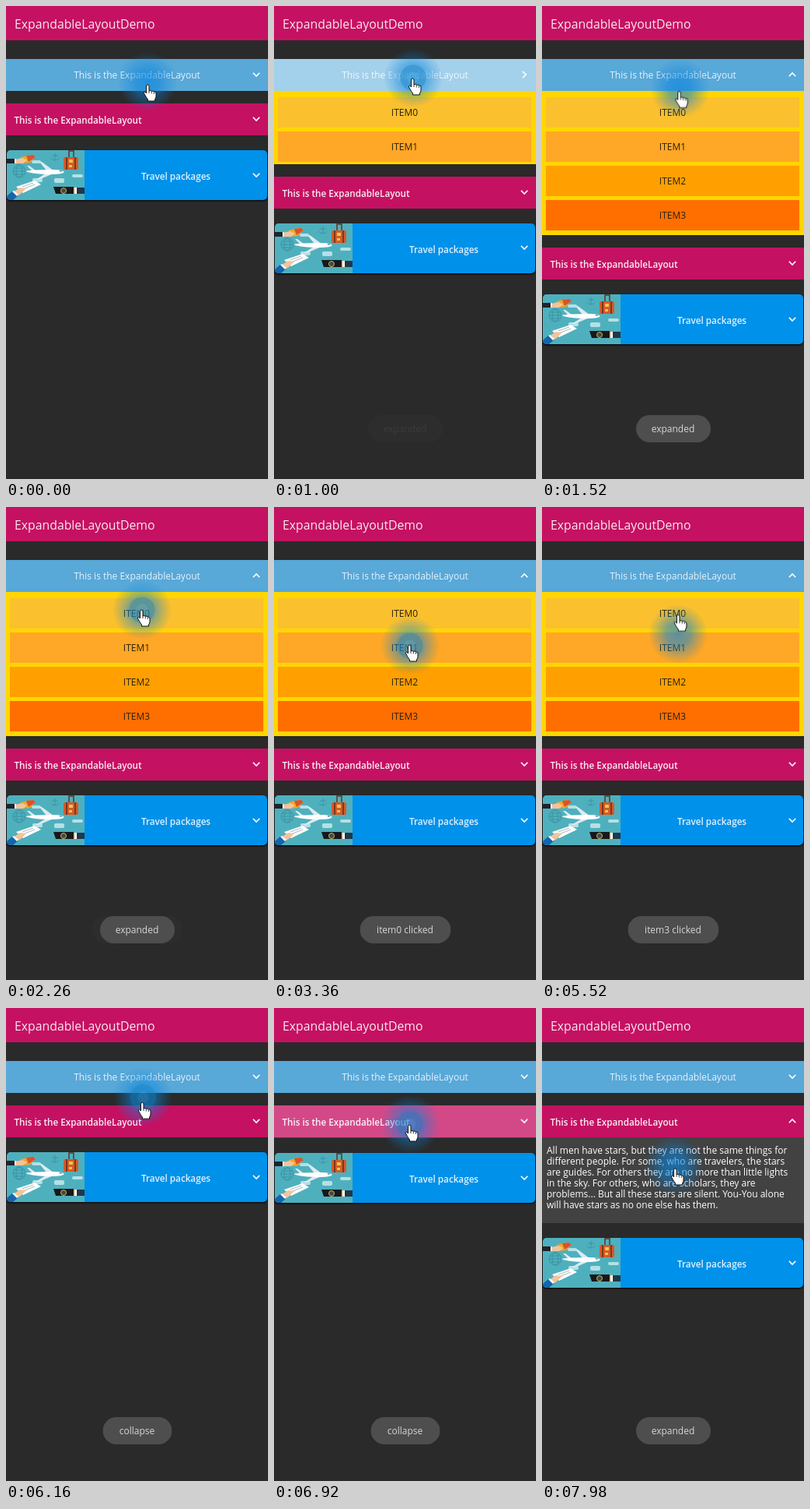
An HTML page that plays this animation: 337 px wide and 607 px high, repeating every 8 s.

```html
<!DOCTYPE html>
<html lang="en">
<head>
<meta charset="utf-8">
<title>ExpandableLayoutDemo</title>
<style>
html, body { margin: 0; width: 100%; height: 100%; overflow: hidden; background: #2a2a2a; }
#stage { position: relative; width: 337px; height: 607px; overflow: hidden; background: #2a2a2a;
  font: 400 12px "Open Sans", "Noto Sans", sans-serif; color: #fff; }
#stage * { box-sizing: border-box; }

.bar { height: 44px; margin-bottom: 24px; padding-left: 11px; font-size: 15.8px; line-height: 47px;
  color: #f8e8f0; background: #c51162; }
.head { position: relative; height: 41px; line-height: 42px; }
.sky { background: #58a8d8; text-align: center; color: #e6f2fa; }
.pink { margin-top: 16px; padding-left: 10.5px; background: #c51162; font-weight: 600; font-size: 11.7px; color: #fbeef4; }
.chevron { position: absolute; left: 317px; top: 50%; width: 10px; height: 10px; margin-top: -5.5px;
  fill: none; stroke: #fff; stroke-width: 1.6; }
.ripple { position: absolute; inset: 0; background: #fff; opacity: 0; }

.fold { height: 0; overflow: hidden; }
.items { height: 185px; padding: 8px 6px 0 5px; background: #ffd600; color: #2b2210; }
.items div { height: 39px; margin-bottom: 5px; line-height: 39px; text-align: center; }
.quote { height: 110px; padding: 10px 0 0 6px; background: #424242; line-height: 14.1px; white-space: nowrap; }

.card { position: relative; width: 335px; height: 64px; margin: 19px 0 0 1px; border-radius: 5px;
  overflow: hidden; background: #0091ea; }
.shade { filter: drop-shadow(0 1px 1px #000); }
.card svg.art { position: absolute; left: 0; top: 0; }
.card span { position: absolute; left: 100px; right: 0; text-align: center; line-height: 66px;
  font-weight: 600; font-size: 11.7px; color: #e0f1fd; }
.card .chevron { left: 316px; }

.toast { position: absolute; left: 168.5px; top: 525px; height: 35px; border-radius: 18px; line-height: 35px;
  text-align: center; background: #4e4e4e; color: #d6d6d6; opacity: 0; transform: translateX(-50%); }

.halo, .hand { position: absolute; left: 0; top: 0; }
.halo i { position: absolute; left: -38px; top: -38px; width: 76px; height: 76px; border-radius: 50%;
  background: radial-gradient(closest-side, #0a84dca8, #0a84dc88 40%, #0a84dc40 70%, #0a84dc00); }
.halo b { position: absolute; left: -17px; top: -17px; width: 34px; height: 34px; border-radius: 50%;
  background: radial-gradient(closest-side, #55b0d030 40%, #1a80b038 46%, #1a80b050 94%, #1a80b000); }

/* one shared 8 s clock: 1% = 80 ms */
.run { animation: 8s ease-in-out infinite; }
#fold1 { animation-name: fold1; }
#fold2 { animation-name: fold2; }
#turn1 { animation-name: turn1; }
#turn2 { animation-name: turn2; }
#ripple1 { animation-name: ripple1; }
#ripple2 { animation-name: ripple2; }
.hand { animation-name: path; }
.halo { animation-name: trail; }
.halo b { animation-name: press; }
@keyframes fold1 { 0%, 10.94% { height: 0 } 14.06%, 71.9% { height: 185px } 75%, 100% { height: 0 } }
@keyframes fold2 { 0%, 86.25% { height: 0 } 89.4%, 100% { height: 110px } }
@keyframes turn1 { 0%, 10.94% { transform: none } 14.06%, 71.9% { transform: rotate(-180deg) } 75%, 100% { transform: none } }
@keyframes turn2 { 0%, 86.25% { transform: none } 89.4%, 100% { transform: rotate(-180deg) } }
@keyframes ripple1 { 0%, 10% { opacity: 0 } 11.5%, 12.6% { opacity: .45 } 16%, 71% { opacity: 0 }
  72.5%, 73.2% { opacity: .45 } 76.5%, 100% { opacity: 0 } }
@keyframes ripple2 { 0%, 85.5% { opacity: 0 } 87%, 88% { opacity: .3 } 91%, 100% { opacity: 0 } }
@keyframes path {
  0% { transform: translate(182px, 101px) }
  8%, 14% { transform: translate(178px, 93px) }
  25%, 31% { transform: translate(174px, 132px) }
  40%, 45% { transform: translate(174px, 177px) }
  53%, 59% { transform: translate(172px, 217px) }
  63.5%, 65.5% { transform: translate(172px, 262px) }
  71%, 73% { transform: translate(176px, 92px) }
  81%, 91% { transform: translate(174px, 150px) }
  100% { transform: translate(171px, 206px) }
}
@keyframes trail {
  0% { transform: translate(182px, 97px) }
  8.5%, 14.5% { transform: translate(179px, 92px) }
  25.5%, 31.5% { transform: translate(175px, 132px) }
  40.5%, 45.5% { transform: translate(175px, 178px) }
  53.5%, 59.5% { transform: translate(172px, 217px) }
  64%, 66% { transform: translate(172px, 262px) }
  71.5%, 73.5% { transform: translate(177px, 92px) }
  81.5%, 91.5% { transform: translate(175px, 149px) }
  100% { transform: translate(170px, 202px) }
}
@keyframes press {
  0%, 9.5% { opacity: 0 } 10.5%, 13.5% { opacity: 1 }
  15.5%, 25.5% { opacity: 0 } 26.5%, 29.5% { opacity: 1 }
  31.5%, 40% { opacity: 0 } 41%, 44% { opacity: 1 }
  46%, 54% { opacity: 0 } 55.5%, 58.5% { opacity: 1 }
  60%, 63% { opacity: 0 } 64%, 66.5% { opacity: 1 }
  68%, 70.5% { opacity: 0 } 71.5%, 77.2% { opacity: 1 }
  79%, 84.5% { opacity: 0 } 85.5%, 88.5% { opacity: 1 }
  90.5%, 100% { opacity: 0 }
}
</style>
</head>
<body>
<div id="stage">
  <div class="bar">ExpandableLayoutDemo</div>

  <div class="head sky">This is the ExpandableLayout
    <div class="ripple run" id="ripple1"></div>
    <svg class="chevron run" id="turn1" viewBox="0 0 10 10"><path d="M.8 2.8 5 7 9.2 2.8"/></svg>
  </div>
  <div class="fold run" id="fold1">
    <div class="items">
      <div style="background:#fbc02d">ITEM0</div>
      <div style="background:#ffa726">ITEM1</div>
      <div style="background:#ffa000">ITEM2</div>
      <div style="background:#ff6f00">ITEM3</div>
    </div>
  </div>

  <div class="head pink">This is the ExpandableLayout
    <div class="ripple run" id="ripple2"></div>
    <svg class="chevron run" id="turn2" viewBox="0 0 10 10"><path d="M.8 2.8 5 7 9.2 2.8"/></svg>
  </div>
  <div class="fold run" id="fold2">
    <div class="quote">All men have stars, but they are not the same things for<br>different people. For some, who are travelers, the stars<br>are guides. For others they are no more than little lights<br>in the sky. For others, who are scholars, they are<br>problems... But all these stars are silent. You-You alone<br>will have stars as no one else has them.</div>
  </div>

  <div class="shade"><div class="card">
    <svg class="art" width="100" height="64">
      <path fill="#4fb0bd" d="M0 0h100v64H0z"/>
      <!-- globe, anchor, clouds -->
      <g fill="none" stroke="#3b93a4">
        <circle cx="16" cy="27" r="8"/><ellipse cx="16" cy="27" rx="4" ry="8"/><path d="M8 27h16M9.500 23h13M9.500 31h13"/>
        <path d="M62 4v9M58 7h8M57 10q1 3 5 3t5-3"/>
      </g>
      <g fill="#b5e0e5"><rect x="32" y="13" width="12" height="4" rx="2"/><rect x="61" y="36" width="13" height="6" rx="2"/><rect x="33" y="36" width="13" height="5" rx="2"/><rect x="84" y="31" width="14" height="4" rx="2"/></g>
      <!-- hand with tickets -->
      <path fill="#f5a623" d="m18 9 13-3 6 2-7 8-11 1z"/>
      <path fill="#d9532c" d="m25 7 9-1 3 3-9 6z"/>
      <path fill="#f3c39b" d="M11 12l9-2 6 3-5 4H11z"/>
      <path fill="#20242c" d="M0 11h11v6H0z"/><path fill="#fff" d="M10 11h2v6h-2z"/>
      <!-- suitcase -->
      <path fill="none" stroke="#5b3424" stroke-width="1.500" d="M80 10V1h6v9"/>
      <rect x="73" y="9" width="19" height="16" rx="2" fill="#d65a27"/>
      <path fill="#7b3820" d="M76 9h2v16h-2zM87 9h2v16h-2z"/>
      <path fill="#f4c34a" d="M80 12h5v4h-5zM80 19h4v3h-4z"/>
      <!-- plane -->
      <path fill="#dcebef" d="m51 26-9-11h3l15 11zM50 30l-13 8h4l19-8zM32 26l-6-6h3l8 6z"/>
      <path fill="#fff" d="M24 27q8-2 36-2 12 0 14 3-2 3-16 3-24 0-34-4z"/>
      <path fill="#3a7f95" d="M68 26q3 0 4 1.500h-4z"/>
      <!-- hand with boarding pass -->
      <path fill="#fff" d="m12 47 24-8 8 5-23 11z"/>
      <path stroke="#a9b7bd" d="m20 47 14-5M23 49l13-5"/>
      <path fill="#f3c39b" d="m8 54 9-6 8 1-7 7-5 3z"/>
      <path fill="#1565ad" d="M0 59l8-7 7 6-7 6H0z"/><path fill="#fff" d="m7 53 2-1 6 5-2 2z"/>
      <!-- wrist with watch -->
      <path fill="#f3c39b" d="M62 48h28v8H66z"/>
      <path fill="#16181d" d="M60 47h26v9H63z"/>
      <circle cx="73" cy="52" r="3.500" fill="#3c4a4c" stroke="#d9b44a"/>
      <path fill="#fff" d="M88 48h2v8h-2z"/><path fill="#20384a" d="M90 48h10v8H90z"/>
    </svg>
    <span>Travel packages</span>
    <svg class="chevron" viewBox="0 0 10 10"><path d="M.8 2.8 5 7 9.2 2.8"/></svg>
  </div></div>

  <div id="toasts"></div>

  <div class="halo run"><i></i><b class="run"></b></div>
  <svg class="hand run" width="22" height="26" viewBox="-6 -2 22 26" style="margin:-2px 0 0 -6px">
    <path fill="#fff" stroke="#111" stroke-linejoin="round" d="M-1.5 2q0-2 1.7-2T2 2v6q2-1.2 3.3.3 2-.8 3 .7 2.7-.5 2.7 2v4q0 2-1.5 4v2H.5v-2q-1.8-2-3-4.5l-2-3.5q-.5-1.5.8-1.8 1.2 0 2.2 1.8z"/>
    <path stroke="#111" stroke-width=".8" d="M2 8v3M5.3 8.5v3M8.3 9.500v2.500"/>
  </svg>
</div>
<script>
const LOOP = 8000, FADE = 260;
const toasts = [
  [945, "expanded", 96], [2200, "item0 clicked", 117], [3390, "item1 clicked", 117],
  [4380, "item2 clicked", 117], [5160, "item3 clicked", 117], [5830, "collapse", 89], [6980, "expanded", 96]
];
const holder = document.getElementById("toasts");
const sheet = document.head.appendChild(document.createElement("style"));
const pct = ms => Math.min(100, ms / LOOP * 100).toFixed(3) + "%";

// each newcomer fades in beneath the previous toast, which then fades away
toasts.forEach(([start, text, width], i) => {
  const end = i + 1 < toasts.length ? toasts[i + 1][0] + 100 : LOOP;
  const leave = end < LOOP ? `${pct(end + 200)}, 100% { opacity: 0 }` : "";
  sheet.textContent += `@keyframes toast${i} { 0%, ${pct(start)} { opacity: 0 }
    ${pct(start + FADE)}, ${pct(end)} { opacity: 1 } ${leave} }`;
  const pill = document.createElement("div");
  pill.className = "toast run";
  pill.textContent = text;
  pill.style.width = width + "px";
  pill.style.animationName = "toast" + i;
  holder.prepend(pill);
});
</script>
</body>
</html>
```
